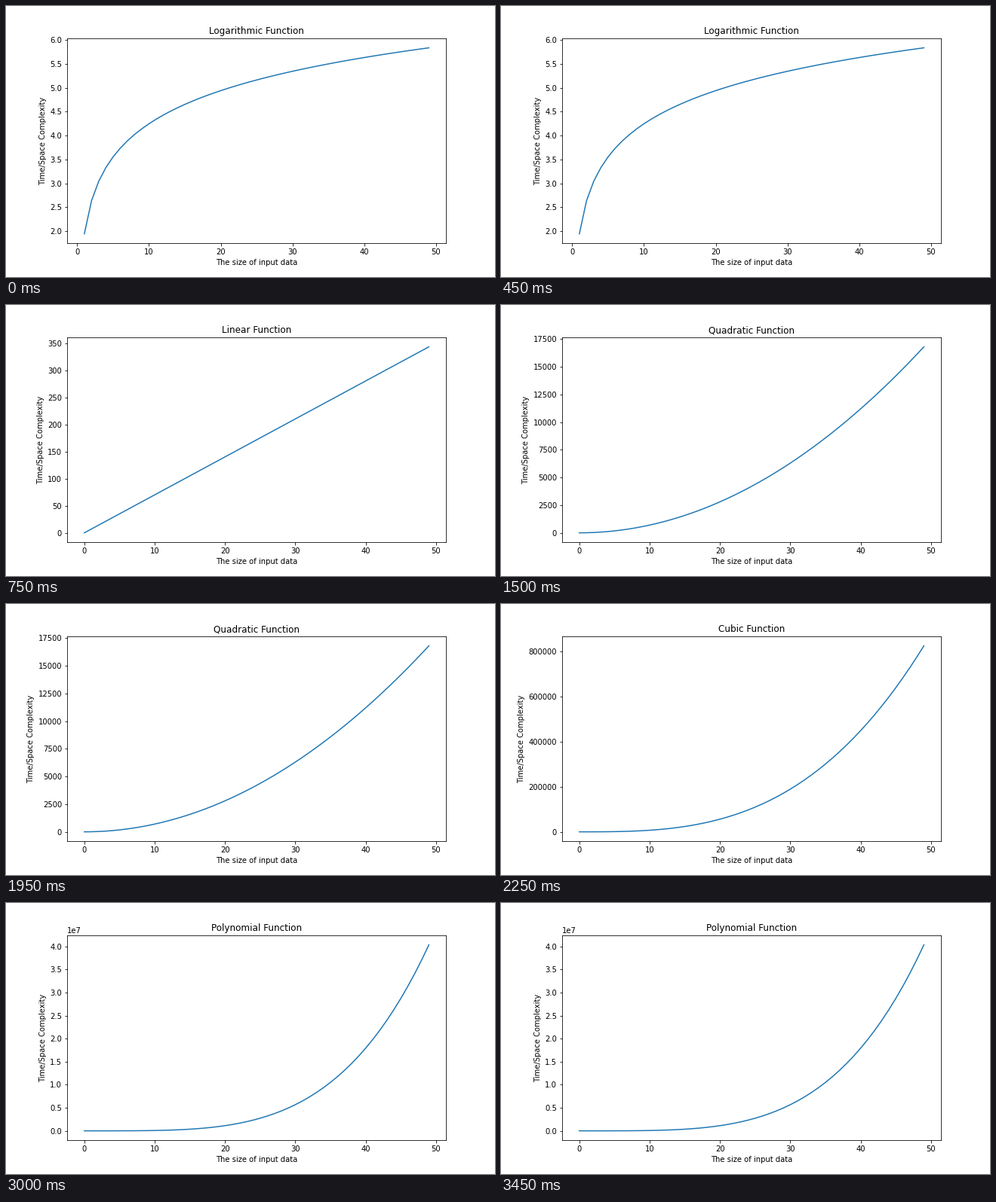
Recreate the animation shown at these times as a matplotlib script. Size 648x360 px, loop 3750 ms.

```python
import numpy as np
import matplotlib.pyplot as plt
from matplotlib.animation import FuncAnimation

SCALE = 7
STEP_MS = 750

# Title, first input size, growth function
CURVES = [
    ("Logarithmic Function", 1, lambda x: np.log(SCALE * x)),
    ("Linear Function", 0, lambda x: SCALE * x),
    ("Quadratic Function", 0, lambda x: SCALE * x**2),
    ("Cubic Function", 0, lambda x: SCALE * x**3),
    ("Polynomial Function", 0, lambda x: SCALE * x**4),
]

plt.rcParams.update({"font.family": "DejaVu Sans", "font.size": 10})

fig, ax = plt.subplots(figsize=(9, 5), dpi=72, facecolor="white")
fig.subplots_adjust(left=0.125, right=0.9, bottom=0.125, top=0.88)


def draw(i):
    title, start, growth = CURVES[i % len(CURVES)]
    x = np.arange(start, 50, dtype=float)
    ax.clear()
    ax.plot(x, growth(x), color="#1f77b4", linewidth=1.5)
    ax.set_title(title, fontsize=12)
    ax.set_xlabel("The size of input data")
    ax.set_ylabel("Time/Space Complexity")
    return ax.get_children()


anim = FuncAnimation(fig, draw, frames=len(CURVES), interval=STEP_MS,
                     repeat=True, repeat_delay=0, blit=False)
plt.show()
```
